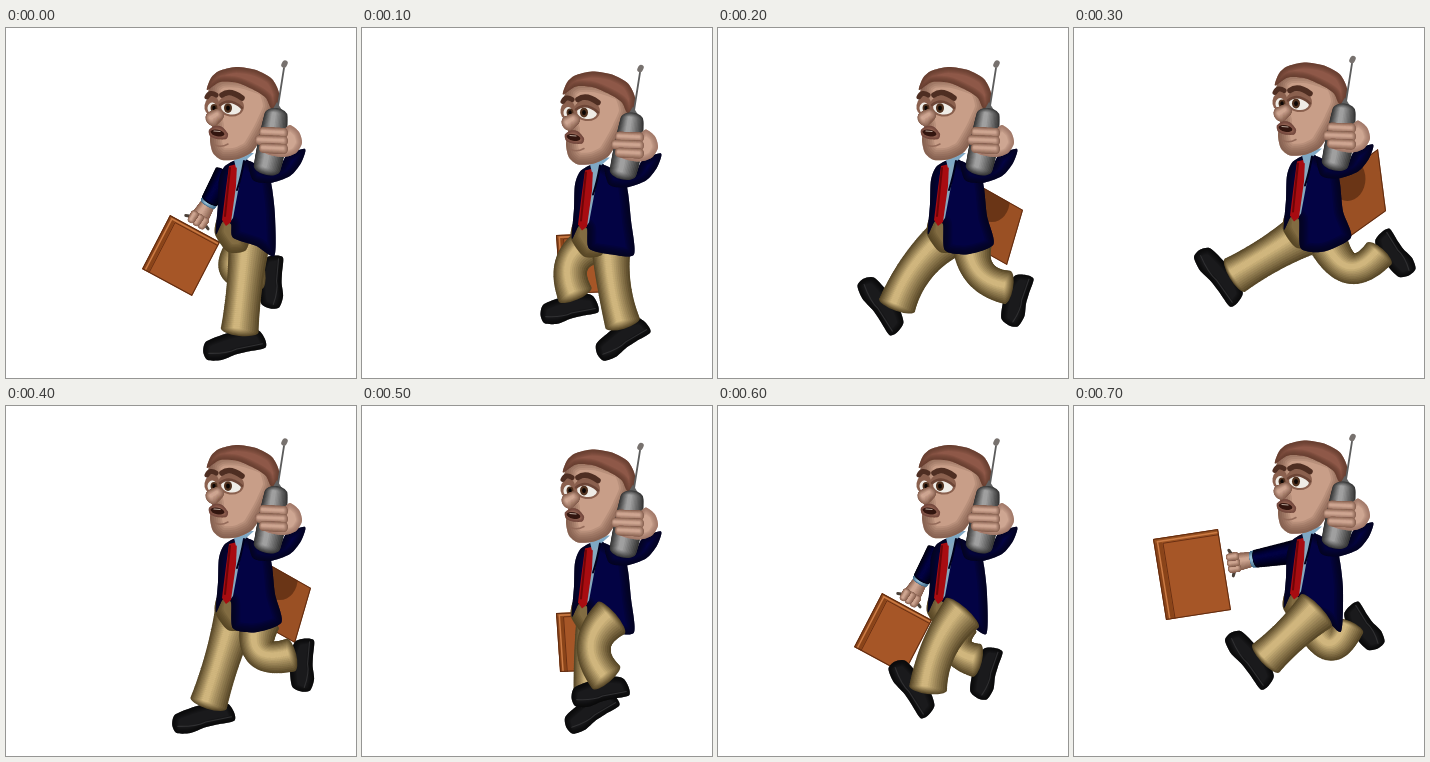
An HTML page with a canvas that plays this animation: 350 px wide and 350 px high, repeating every 0.8 s.

```html
<!DOCTYPE html>
<html lang="en">
<head>
<meta charset="utf-8">
<title>Running late</title>
<style>
html, body { margin: 0; width: 100%; height: 100%; overflow: hidden; background: #fff; }
canvas { display: block; width: 350px; height: 350px; }
</style>
</head>
<body>
<canvas id="stage" width="350" height="350"></canvas>
<script>
const ctx = document.getElementById('stage').getContext('2d');
const STEP = 100, STEPS = 8;

// Each tone runs from shadow to light.
const TONE = {
  tan: [[88, 72, 40], [208, 182, 126]],
  seat: [[60, 48, 26], [130, 108, 66]],
  navy: [[0, 0, 18], [3, 3, 68]],
  skin: [[92, 64, 52], [200, 158, 136]],
  fist: [[136, 98, 82], [206, 166, 146]],
  hair: [[84, 46, 36], [142, 88, 72]],
  lips: [[92, 58, 48], [146, 98, 82]],
  grey: [[56, 56, 56], [160, 160, 160]],
  shoe: [[0, 0, 0], [26, 26, 28]],
  blue: [[70, 110, 140], [150, 190, 214]]
};

// One foot through a whole stride: x, y, turn in degrees.
const STRIDE = [
  [228, 317, -9], [260, 311, -28], [299, 272, -68], [321, 226, -119],
  [297, 259, -82], [238, 286, -8], [194, 282, 60], [176, 253, 57]
];

// Briefcase from its foremost to its rearmost place: corner, top edge, side edge.
const SWING = [
  { at: [79, 133], across: [65, -10], down: [13, 81], grip: [163, 156] },
  { at: [164, 187], across: [50, 27], down: [-28, 54], grip: [194, 189] },
  { at: [194, 207], across: [52, -2], down: [4, 59] },
  { at: [266, 160], across: [39, 22], down: [-16, 55] },
  { at: [262, 151], across: [42, -30], down: [8, 62] }
];

const rgb = c => `rgb(${c.map(Math.round)})`;
const mix = ([a, b], t) => rgb(a.map((v, i) => v + (b[i] - v) * t));
const points = s => s.trim().split(/\s+/).map(p => p.split(',').map(Number));
const wave = p => Math.cos(p * 2 * Math.PI / STEPS);
const wrap = p => (p + STEPS) % STEPS;

// Closed smooth outline through the points.
function blob(s) {
  const p = points(s), n = p.length, path = new Path2D();
  const at = i => p[(i + n) % n];
  path.moveTo(...p[0]);
  for (let i = 0; i < n; i++) {
    const [a, b, c, d] = [at(i - 1), at(i), at(i + 1), at(i + 2)];
    path.bezierCurveTo(
      b[0] + (c[0] - a[0]) / 8, b[1] + (c[1] - a[1]) / 8,
      c[0] - (d[0] - b[0]) / 8, c[1] - (d[1] - b[1]) / 8, ...c);
  }
  path.closePath();
  return path;
}

// Rounded solid: flat fill with shade gathering at the rim.
function solid(s, tone, depth = 3) {
  const path = blob(s);
  ctx.save();
  ctx.fillStyle = rgb(tone[1]);
  ctx.fill(path);
  ctx.clip(path);
  ctx.strokeStyle = rgb(tone[0]);
  ctx.globalAlpha = 0.15;
  for (let i = 1; i <= 6; i++) {
    ctx.lineWidth = i * depth;
    ctx.stroke(path);
  }
  ctx.restore();
}

function oval(x, y, rx, ry, fill, turn = 0) {
  ctx.fillStyle = fill;
  ctx.beginPath();
  ctx.ellipse(x, y, rx, ry, turn, 0, 7);
  ctx.fill();
}

function line(d, color, width) {
  ctx.strokeStyle = color;
  ctx.lineWidth = width;
  ctx.lineCap = 'round';
  ctx.stroke(new Path2D(d));
}

function poly(s, fill) {
  ctx.fillStyle = fill;
  ctx.fill(new Path2D(`M${s}Z`));
}

// Shaded tube along a curve; joints hold x, y and half width.
function tube(joints, tone, cap = 5) {
  const a = joints[0], z = joints[joints.length - 1];
  const m = joints.length > 2 ? joints[1] : a.map((v, i) => (v + z[i]) / 2);
  const c = m.map((v, i) => 2 * v - (a[i] + z[i]) / 2);
  for (let k = 0; k < 10; k++) {
    const f = 1 - k * 0.09;
    for (let i = 0; i <= 48; i++) {
      const t = i / 48, u = 1 - t;
      const [x, y, w] = a.map((v, j) => u * u * v + 2 * u * t * c[j] + t * t * z[j]);
      const dx = u * (c[0] - a[0]) + t * (z[0] - c[0]);
      const dy = u * (c[1] - a[1]) + t * (z[1] - c[1]);
      oval(x - k * w * 0.02, y - k * w * 0.015, cap * f, w * f, mix(tone, k / 9), Math.atan2(dy, dx));
    }
  }
}

function shoe(x, y, turn, size) {
  ctx.save();
  ctx.translate(x, y);
  ctx.rotate(turn);
  ctx.scale(size, 1.08);
  solid('-30,2 -26,-7 -10,-11 10,-13 25,-10 30,-1 29,7 12,8 0,9 -14,12 -27,10', TONE.shoe, 2);
  line('M-25,4 Q-8,7 2,4 L27,3', '#303032', 1);
  ctx.restore();
}

// The far leg runs the same stride, half a cycle apart.
function leg(phase, far) {
  const back = wave(phase - 3);
  const [fx, fy, deg] = STRIDE[phase];
  const x = fx - (far ? 31 : 0), y = fy - (far ? 5 : 0);
  const turn = deg * Math.PI / 180, sin = Math.sin(turn), cos = Math.cos(turn);
  const hip = [249 + 7 * back - (far ? 14 : 0), 212 + 7 * back + (far ? 2 : 0)];
  const ankle = [x + 14 * sin + 8 * cos, y - 14 * cos + 8 * sin];
  const [vx, vy] = [ankle[0] - hip[0], ankle[1] - hip[1]];
  const bend = Math.max(0, 9 + 11 * wave(phase - 3.7)) / Math.hypot(vx, vy);
  const knee = [(hip[0] + ankle[0]) / 2 - vy * bend, (hip[1] + ankle[1]) / 2 + vx * bend];
  const w = 17 - 1.5 * back;
  shoe(x, y, turn, (58 - 7 * back) / 60);
  tube([[...hip, w + 4], [...knee, w], [...ankle, w + 1]], TONE.tan, 6);
}

function briefcase({ at, across, down }, behind) {
  const spot = (u, v) => at.map((c, i) => c + across[i] * u + down[i] * v);
  const box = (u, v) => `${spot(0, 0)} ${spot(u, 0)} ${spot(u, v)} ${spot(0, v)}`;
  poly(box(1, 1), behind ? '#9a5024' : '#a65627');
  ctx.save();
  ctx.clip(new Path2D(`M${box(1, 1)}Z`));
  if (behind) {
    oval(...spot(0.25, 0.12), 18, 22, 'rgba(60,26,8,.5)');
  } else {
    poly(box(0.13, 1), '#8a4419');
    poly(box(1, 0.06), '#97501f');
    line(`M${spot(0.06, 1)} L${spot(0.06, 0.04)} L${spot(1, 0.04)}`, '#cb7a44', 1.5);
    line(`M${spot(0.14, 1)} L${spot(0.14, 0.07)} L${spot(1, 0.07)}`, '#6b3012', 1);
  }
  line(`M${box(1, 1)}Z`, '#5f2b10', 2);
  ctx.restore();
}

function caseArm(grip) {
  const shoulder = [220, 146];
  const d = [grip[0] - shoulder[0], grip[1] - shoulder[1]];
  const l = Math.hypot(...d), [ux, uy] = d.map(v => v / l);
  const along = (n, side = 0) => [grip[0] + ux * n - uy * side, grip[1] + uy * n + ux * side];
  line(`M${along(6, -13)} Q${along(-1)} ${along(6, 13)}`, '#4a4038', 3);
  tube([[...along(-17), 7], [...along(0), 9]], TONE.fist, 5);
  for (const side of [-6, 0, 6])
    tube([[...along(0, side), 4], [...along(7, side), 3.5]], TONE.fist, 3);
  tube([[...along(-19), 8.5], [...along(-15), 8]], TONE.blue, 2);
  tube([[...shoulder, 12], [...along(-19), 9]], TONE.navy, 3);
}

// The tail of the jacket swings with the near leg.
function torso(back) {
  const hem = `${272 + 5 * back},${222 - 8 * back} 250,${222 + 6 * back} 227,${216 + 9 * back}`;
  solid('212,190 228,188 244,200 240,222 222,224 209,206', TONE.seat);
  solid(`236,130 246,135 262,146 266,160 269,188 ${hem} 225,196 217,193 210,206 212,176 213,152 219,138`, TONE.navy);
  poly('230,137 238,133 233,158 227,190 224,194', '#86a9be');
  poly('223,138 231,136 230,158 225,194 220,198 216,192 220,160', '#a80c11');
  line('M224,140 L219,188', '#6e0508', 2);
  poly('228,132 234,125 248,125 239,133 230,140', '#7fa8c4');
  line('M238,133 Q235,150 231,162', '#00001c', 2);
}

function eye(x, y, rx, ry, gaze) {
  oval(x, y - 1, rx + 3, ry + 4, '#8a604e', 0.15);
  oval(x, y + 1, rx, ry, '#efece6', 0.15);
  oval(gaze, y + 1, ry * 0.62, ry * 0.75, '#50321f');
  oval(gaze, y + 1, ry * 0.3, ry * 0.4, '#0c0705');
}

function head() {
  solid('204,56 202,72 202,86 206,98 204,112 207,125 216,132 232,131 246,124 254,112 262,97 269,78 262,58 235,48 215,48', TONE.skin, 4);
  solid('201,62 205,50 213,43 230,39 250,42 266,51 273,65 271,78 265,80 260,70 250,63 232,55 214,54', TONE.hair, 2);
  eye(206, 79, 4.5, 5.5, 208);
  eye(225, 79, 10, 6.5, 222);
  line('M214,77 Q224,69 236,80', '#6d4637', 2.5);
  line('M201,69 Q204,63 210,67', '#4e2e22', 5);
  line('M216,67 Q224,61 236,70', '#4e2e22', 5.5);
  tube([[212, 87, 6], [206, 91, 7.5]], TONE.fist, 6);
  solid('203,102 209,98 216,99 222,106 220,111 211,111 204,108', TONE.lips, 1);
  oval(211.5, 105, 7, 3.2, '#32150f', 0.2);
  line('M208,103 L214,103.5', '#b7a599', 1.2);
  line('M209,117 Q215,120 222,116', '#946b5a', 1.5);
}

function phone() {
  solid('243,133 262,143 274,139 281,127 299,121 295,135 284,148 264,155 247,152', TONE.navy, 2.5);
  line('M272,78 L278,40', '#5c5c5c', 1.8);
  line('M278,37 L279,35', '#77716e', 5.5);
  poly('265,84 271,74 277,84', '#606060');
  tube([[270, 87, 11.5], [266, 115, 14], [261, 140, 13.5]], TONE.grey, 7);
  solid('257,102 276,102 284,97 293,104 296,115 290,125 277,129 258,124', TONE.fist, 2);
  for (const i of [0, 1, 2])
    tube([[257 - 4 * (i % 2), 104 + 8 * i, 4.8], [278, 105 + 8 * i, 5]], TONE.fist, 4);
}

function draw(step) {
  const near = step, far = wrap(step - 4);
  const reach = wrap(step + 1);
  const swing = Math.min(reach, STEPS - reach);
  const pose = SWING[swing];
  const legOnTop = near > 4;

  ctx.fillStyle = '#fff';
  ctx.fillRect(0, 0, 350, 350);
  briefcase(pose, swing > 2);
  if (pose.grip) caseArm(pose.grip);
  leg(far, true);
  if (!legOnTop) leg(near);
  ctx.save();
  ctx.translate(0, 4.5 * wave(2 * (step - 1)));
  torso(wave(step - 3));
  head();
  phone();
  ctx.restore();
  if (legOnTop) leg(near);
}

let shown = -1;
function tick() {
  const step = Math.floor(performance.now() / STEP) % STEPS;
  if (step !== shown) draw(shown = step);
  requestAnimationFrame(tick);
}
tick();
</script>
</body>
</html>
```
